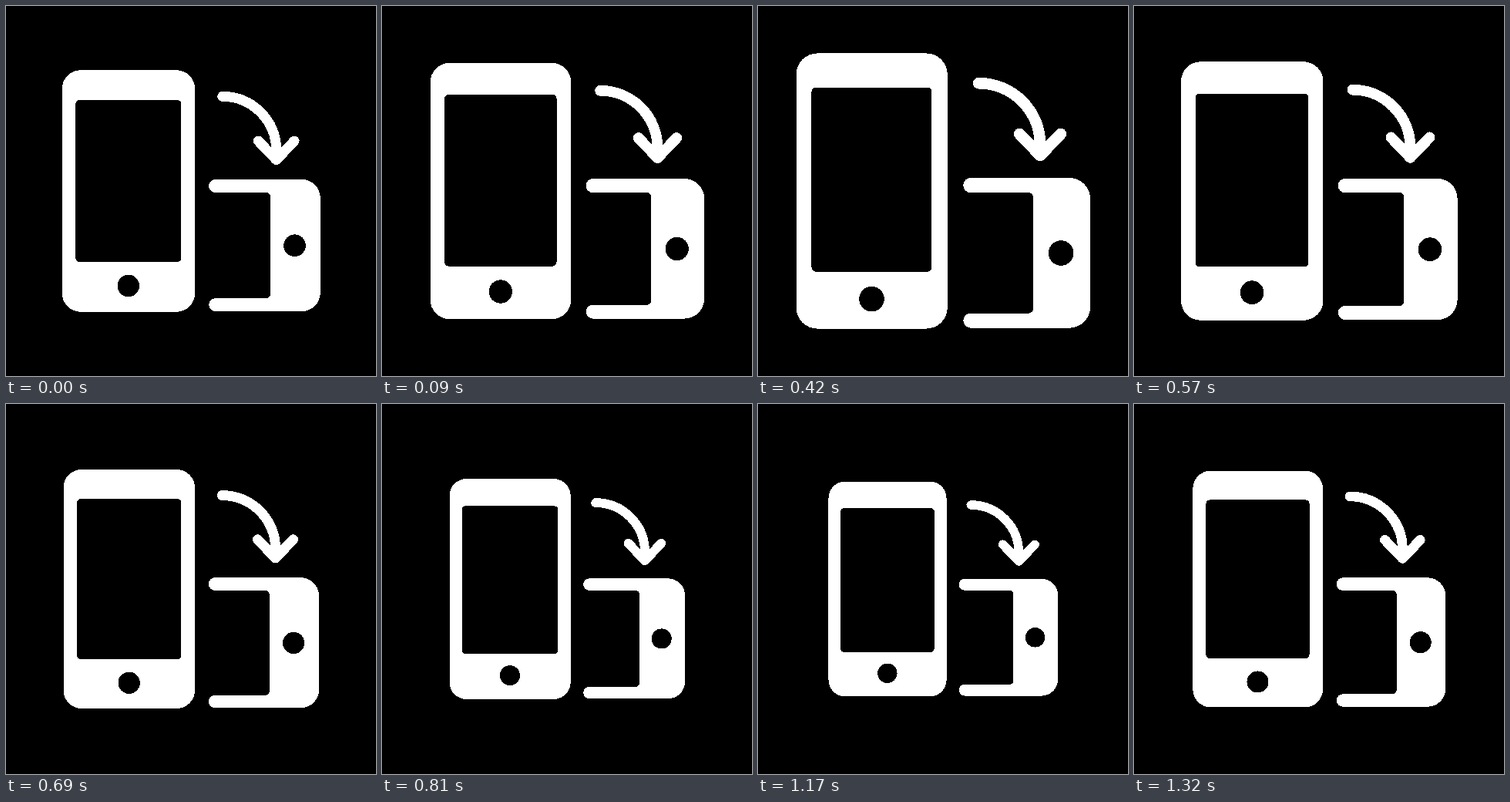
An HTML page that plays this animation: 480x480 px, repeating every 1.35 s.

```html
<!DOCTYPE html>
<html lang="en">
<head>
<meta charset="utf-8">
<title>Rotate phone</title>
<style>
  html, body { margin: 0; height: 100%; overflow: hidden; background: #000; }
  svg { display: block; width: 100vw; height: 100vh; shape-rendering: crispEdges; }
</style>
</head>
<body>
<svg viewBox="-240.3 -240 480 480">
  <g id="icon" fill="#fff">
    <!-- upright phone -->
    <rect x="-167.5" y="-156.75" width="172.3" height="313.5" rx="24"/>
    <rect x="-150" y="-118" width="137" height="210" rx="5" fill="#000"/>
    <circle cx="-81.5" cy="123" r="14.3" fill="#000"/>
    <!-- sideways phone, partly hidden -->
    <path d="M31.3-15H143.5a24 24 0 0 1 24 24V132a24 24 0 0 1-24 24H31.3a8.4 8.4 0 0 1 0-16.8H97.5a5 5 0 0 0 5-5V7a5 5 0 0 0-5-5H31.3a8.5 8.5 0 0 1 0-17z"/>
    <circle cx="134.2" cy="70.7" r="14.3" fill="#000"/>
    <!-- arrow -->
    <path d="M40.4-122.7A70 70 0 0 1 110.4-52.7V-42M87-65L110.4-40.4L133.8-65" fill="none" stroke="#fff" stroke-width="13" stroke-linecap="round" stroke-linejoin="round"/>
  </g>
</svg>
<script>
  const LOOP = 1350, STEP = 30;
  const icon = document.getElementById('icon');
  const start = performance.now();

  function draw(now) {
    const elapsed = Math.max(0, now - start) % LOOP;
    const time = Math.floor(elapsed / STEP) * STEP;
    const scale = 1 + 0.15 * Math.sin(2 * Math.PI * time / LOOP);
    icon.setAttribute('transform', `scale(${scale})`);
    requestAnimationFrame(draw);
  }
  draw(start);
</script>
</body>
</html>
```
